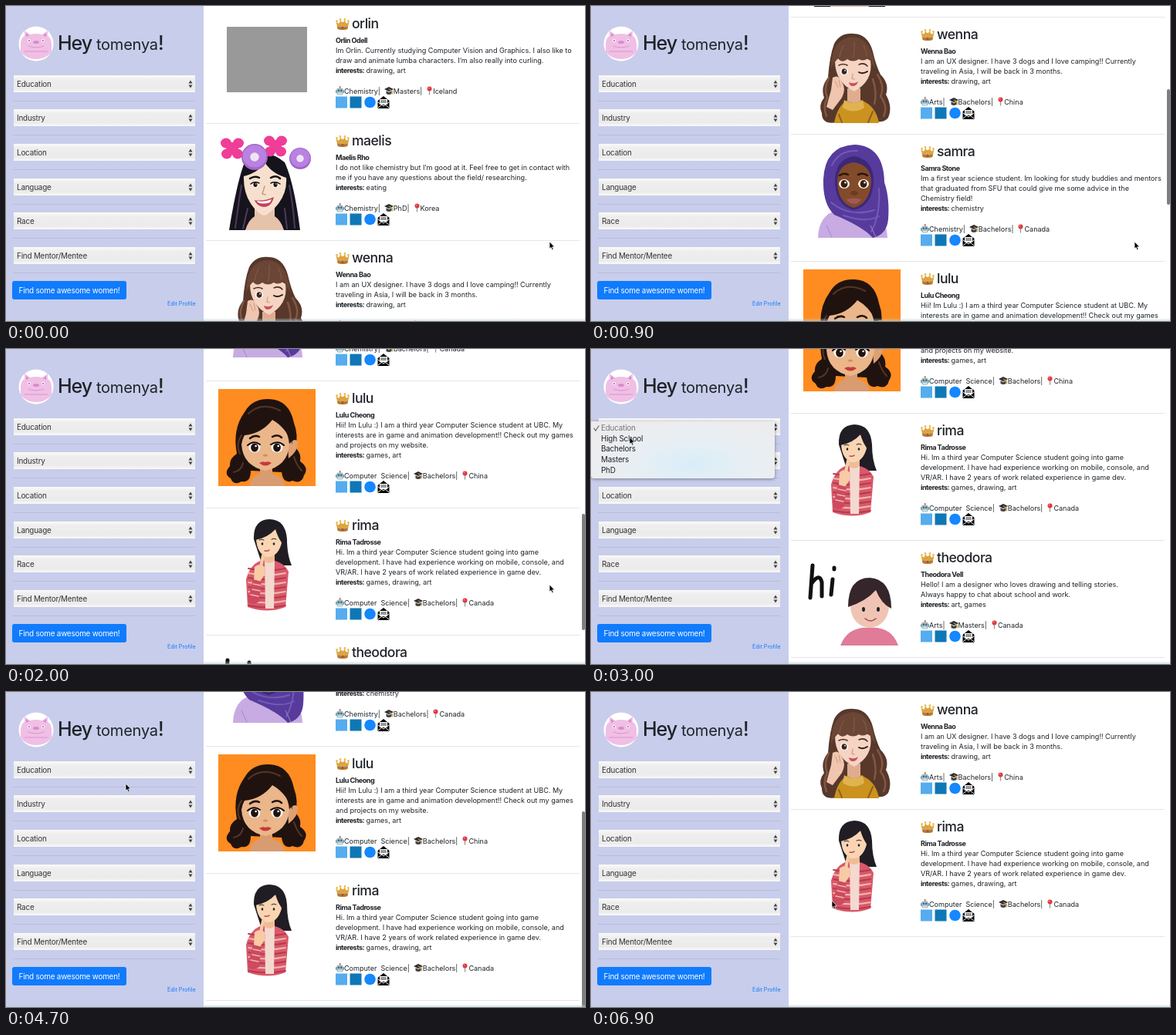
These frames come from a looping animation (750 px wide and 409 px high, 7 s). An HTML page:

```html
<!DOCTYPE html>
<html lang="en">
<head>
<meta charset="utf-8">
<title>Find a mentor</title>
<style>
html, body { margin: 0; width: 100%; height: 100%; overflow: hidden; background: #fff; }
body { position: relative; font: 9.05px/13.2px Inter, sans-serif; color: #1f2328; }
body > *, .row > *, #side > * { position: absolute; }
#side { left: 0; top: 0; width: 256px; height: 409px; background: #c8cdeb; font-size: 9.9px; letter-spacing: -.02em; }
h1 { left: 67px; top: 33px; margin: 0; font: 500 25px/30px Inter, sans-serif; letter-spacing: -.04em; white-space: nowrap; }
h1 small { font-size: 20px; font-weight: 400; letter-spacing: -.01em; }
.select { left: 10px; width: 231px; height: 22px; padding-left: 4px; line-height: 22px; color: #333;
  background: linear-gradient(#fafafa, #eee 25%, #ebebeb 80%, #fafafa); }
.select svg { position: absolute; right: 3px; top: 6px; }
.rule { left: 9px; width: 236px; height: 1px; background: #b9bddb; }
.button { left: 8px; top: 357px; width: 148px; height: 24px; border-radius: 3px; background: #107bfd; color: #fff; line-height: 24px; text-align: center; }
.edit { left: 209px; top: 380px; font-size: 7.2px; letter-spacing: 0; color: #107bfd; white-space: nowrap; }
#menu { left: 0; width: 238px; padding: 2px 0 3px; border-radius: 0 0 4px 4px; font-size: 9.9px; line-height: 13.7px; letter-spacing: -.02em;
  background: radial-gradient(ellipse at 55% 75%, #d9edf8, #e9eff3 45%, #ececee 75%); box-shadow: 0 1px 4px #0006; }
#menu div { padding-left: 13px; }
#menu div:first-child { color: #777; }
#menu svg { position: absolute; left: 3px; top: 5px; }
#list { left: 259px; top: 1px; width: 484px; }
.row { position: relative; border-bottom: 1px solid #e5e5e7; box-sizing: border-box; }
.art { left: 16px; top: 10px; }
.nick { left: 168px; top: 10px; font: 500 17.6px/24px Inter, sans-serif; letter-spacing: -.03em; white-space: nowrap; }
.nick svg { vertical-align: -2px; margin-right: 3px; }
.info { left: 168px; top: 36.5px; white-space: pre; }
.info b { letter-spacing: -.055em; }
.tags { word-spacing: 2.5px; }
.tags svg { vertical-align: -2px; }
.icons { height: 16px; }
#thumb { right: 0; width: 4px; border-radius: 2px; background: #7e7e80; }
#edge { left: 0; bottom: 0; width: 750px; height: 4px; background: linear-gradient(#b9d2dd00, #b9d2dd99); }
#cursor { left: 0; top: 0; }
</style>
</head>
<body>
<div id="list"></div>
<div id="side"></div>
<div id="thumb"></div>
<div id="edge"></div>
<div id="menu"></div>
<svg id="cursor" width="9" height="13"><path d="M1 .5v9.2l2-1.8 1.5 3.4 1.6-.7-1.5-3.3h2.9z" fill="#000" stroke="#fff" stroke-width=".7"/></svg>
<script>
const $ = id => document.getElementById(id);
const svg = (w, h, body, cls = '') => `<svg class="${cls}" width="${w}" height="${h}">${body}</svg>`;
const oval = (x, y, rx, ry, fill) => `<ellipse cx="${x}" cy="${y}" rx="${rx}" ry="${ry}" fill="${fill}"/>`;
const box = (x, y, w, h, fill, r = 0) => `<rect x="${x}" y="${y}" width="${w}" height="${h}" rx="${r}" fill="${fill}"/>`;
const shape = (d, fill) => `<path d="${d}" fill="${fill}"/>`;
const line = (d, color, w = 1.5) => `<path d="${d}" fill="none" stroke="${color}" stroke-width="${w}" stroke-linecap="round"/>`;
const eye = (x, y, r, iris) => oval(x, y, r * 1.15, r, '#fff') + oval(x, y, r * .75, r * .85, iris) + oval(x + r * .25, y - r * .3, r * .2, r * .2, '#fff');

const crown = svg(18, 17, oval(9, 11, 6.5, 3.5, '#8a3d33') + shape('M.5 6l4 3.500 1.500-5.500 3 4.500 3-4.500 1.500 5.500 4-3.500-2 10q-6.500 2-13 0z', '#dfa63c') + shape('M2.300 12.500q6.700 2.500 13.400 0l-.6 3.500q-6.100 1.800-12.200 0z', '#b47a25') +
  [[1.6, 5.5], [6, 3.5], [12, 3.5], [16.4, 5.5]].map(([x, y]) => oval(x, y, 1.4, 1.4, '#e9bf58')).join('') +
  oval(9, 14.3, 1.5, 1.5, '#d2384a') + oval(5, 13.8, 1.1, 1.1, '#4d8fd6') + oval(13, 13.8, 1.1, 1.1, '#4d8fd6'));
const robot = svg(11, 12, box(5, 0, 1.4, 3, '#c8504a') + box(0, 5, 11, 4, '#49a5b5', 1) + box(1.3, 2.5, 8.4, 9, '#a9bcc4', 2) +
  oval(3.8, 5.8, 1.3, 1.3, '#356b80') + oval(7.2, 5.8, 1.3, 1.3, '#356b80') + box(3, 9, 5, 1.3, '#e8eef0'));
const cap = svg(12, 12, shape('M0 4l6-3 6 3-6 3z', '#2c2c30') + shape('M2.5 6l3.5 2 3.5-2v4q-3.500 2-7 0z', '#444') + line('M6 4l4.500 2v4', '#d9a634', 1));
const pin = svg(9, 12, line('M4.500 5v6', '#999', 1.3) + oval(4.5, 3.5, 3, 3, '#e0373f') + oval(3.6, 2.6, .9, .9, '#f79a98'));
const contacts = svg(72, 16, box(0, .5, 15, 15, '#55acee') + box(18.5, .5, 15, 15, '#0f77b5') + oval(44.5, 8, 7.3, 7.3, '#1587ff') +
  shape('M54.500 6l7.500-6 7.500 6v10h-15z', '#000') + box(57, 4, 10, 7, '#fff') + line('M58.500 6h7m-7 2h7', '#000', .8) + line('M55 8l7 5 7-5m-14 7l5-4m9 4l-5-4', '#fff', 1));

const flower = (x, y) => [[-8, -7], [8, -7], [-7, 7], [7, 7]].map(([a, b]) => oval(x + a, y + b, 7, 6.5, '#ef3d98')).join('') + oval(x, y, 8, 8, '#ef3d98');
const ring = (x, y, r) => oval(x, y, r, r, '#a266cc') + oval(x, y - 1, r * .9, r * .85, '#b981e0') + oval(x, y, r * .34, r * .34, '#efe4f6');

const art = {
  block: box(11, 16, 104, 85, '#999'),
  blossoms: shape('M34 40Q60 18 86 40Q98 66 106 128H14Q24 66 34 40z', '#15131c') + line('M30 70Q26 95 22 125M38 100L32 126M92 70Q97 95 99 125M86 100l3 26', '#4c3a5c', 2) +
    shape('M47 99h26v11q8 5 12 18H35q4-13 12-18z', '#e5c3aa') + shape('M33 58Q56 52 59 38Q68 54 88 60Q90 88 63 108Q58 110 53 106Q32 88 33 58z', '#f6e0cd') +
    line('M41 61q6-4 12-1M68 60q7-4 12 1', '#111', 2.5) + eye(48, 69, 3.5, '#23150f') + eye(74, 69, 3.5, '#23150f') + line('M42 68q5-4 11-1M68 67q6-3 12 1', '#111') +
    line('M60 71l-3 10 4 1', '#c79c83') + shape('M47 89Q59 91 72 85Q69 98 59 98Q50 97 47 89z', '#c2415a') + shape('M50 90Q59 92 69 88l-2 4Q58 95 51 92z', '#fff') +
    flower(18, 22) + flower(74, 19) + ring(47, 33, 17) + ring(106, 35, 14),
  wink: shape('M40 24Q48 9 66 11Q84 12 90 34Q94 52 100 64Q112 76 107 90Q116 106 110 120Q104 128 90 124L70 100L44 126Q24 130 24 114Q19 104 27 94Q22 80 32 68Q34 40 40 24z', '#57382b') +
    shape('M40 127Q44 104 58 97H74Q94 104 98 127z', '#cb921f') + shape('M53 97q12 8 24 0l2 10q-14 9-28 0z', '#e0b352') + shape('M57 82h17v16q-8 6-17 0z', '#e0ac90') +
    shape('M41 46Q63 30 87 46Q91 72 66 86Q41 74 41 46z', '#f5d4c3') + shape('M36 56Q36 16 65 15Q90 18 93 56Q88 50 85 42Q78 48 72 44Q64 49 57 44Q50 50 45 43Q40 48 36 56z', '#6b4535') +
    line('M46 52q6-3 11 0M72 51q7-3 11 2', '#4a2e22') + eye(53, 60, 4.5, '#3a241b') + line('M72 61q5 3 11-1', '#2d1c16', 2) + line('M64 63l-1 6 3 1', '#d9a48d') +
    shape('M59 74q7 3 12-1-2 6-7 6-4 0-5-5z', '#c9505a') + shape('M38 68q8-5 12 6 6 8 0 20l-12 16-8-4 6-22z', '#f0c6b0') +
    line('M41 72l4 9m1-10l2 9', '#cf9880', 1) + line('M33 68Q26 82 31 94Q25 106 30 118M96 64Q106 80 100 92Q110 106 104 118M90 70Q96 88 92 102', '#835643', 2.5) +
    line('M52 26Q48 34 47 41M66 22Q66 34 65 42M78 26Q82 34 82 40', '#7d5644') + line('M46 116l4 10M90 112l-6 14', '#8a611b', 2),
  scarf: shape('M19 124Q20 94 44 88H92Q108 100 109 124z', '#c8abe3') + shape('M66 3Q104 4 105 52Q112 72 110 100Q108 120 90 124Q78 110 40 94Q25 80 26 48Q28 5 66 3z', '#563b9c') +
    shape('M65 18Q92 22 91 52Q89 83 65 88Q42 82 41 52Q41 22 65 18z', '#3d2878') + shape('M65 26Q88 29 88 52Q86 80 65 85Q45 79 44 52Q44 29 65 26z', '#824b2b') +
    line('M47 43q5-4 11-1M71 42q7-3 12 1', '#2a150d', 2.5) + eye(53, 54, 6, '#3a1c0d') + eye(78, 54, 6, '#3a1c0d') + oval(66, 66, 5, 3, '#6c3a20') +
    shape('M56 74q9-3 19 0-3 6-9 6-7 0-10-6z', '#a3575a') + line('M37 30Q46 10 70 11M36 78Q60 98 92 88M52 95Q82 105 98 96M98 60Q100 95 88 116', '#735ab7', 2) + line('M30 108l7 15M87 108l7 15', '#a486ca', 1),
  curls: box(0, 0, 126, 126, '#ff8c20') + shape('M34 30Q44 12 66 13Q92 14 98 44Q104 60 100 76Q108 84 106 94Q118 102 111 112Q108 124 96 119Q84 124 82 108L42 106Q42 122 30 120Q20 126 16 116Q6 110 15 100Q14 90 24 84Q18 52 34 30z', '#20130f') +
    shape('M40 126Q42 113 54 110V98H70V110Q84 113 86 126z', '#d99b70') + shape('M90 74q8-12 13-6 1 12-12 22z', '#dfa074') + shape('M30 72Q34 46 66 36Q90 46 92 72Q90 100 61 106Q32 100 30 72z', '#eab68a') +
    shape('M26 72Q30 34 66 26Q94 32 96 72Q88 50 70 40Q56 58 34 60Q30 64 26 72z', '#20130f') + line('M41 64q6-5 12-2M70 62q7-4 12 1', '#21120b', 2.5) +
    eye(47, 76, 6.5, '#20120d') + eye(76, 76, 6.5, '#20120d') + line('M38 73q8-7 16-1M68 72q9-6 17 1', '#140b08', 2) + oval(61, 86, 3, 1.5, '#cd8e67') +
    shape('M53 96q5-3 8-1 4-2 8 1-8 7-16 0z', '#c63a37') + line('M39 32Q56 16 80 28M20 108q10-2 12-12M98 88q4 12 10 18M30 60Q22 72 28 84', '#543628', 2),
  thinker: shape('M46 30Q45 5 66 4Q87 4 89 30Q89 50 95 64H57z', '#201d24') + shape('M38 118L36 82Q42 60 60 56Q84 57 91 72L87 118Q64 127 38 118z', '#d8596b') +
    [...Array(9)].map((_, i) => line(`M39 ${68 + i * 6}q24 5 48 0`, i % 2 ? '#f0b9ab' : '#b83a50', 1.8)).join('') + shape('M60 58h13l-1 62H61z', '#f3d9cf') +
    shape('M59 45h14v13q-7 6-14 0z', '#efbc96') + shape('M49 24Q68 22 79 14L82 35Q77 54 62 53Q48 47 49 24z', '#fad5b4') + shape('M48 31Q49 7 68 8Q85 10 84 37Q77 28 74 17Q64 28 48 31z', '#201d24') +
    line('M53 31q3-2 6 0M69 30q3-2 6 0', '#2a2024', 1) + oval(57, 36, 1.3, 1.8, '#222') + oval(72, 36, 1.3, 1.8, '#222') + line('M60 45q4 1 6-1', '#bd4b4c') +
    line('M58 51L55 66', '#f8cba5', 4) + shape('M47 66q7-6 13 0v10l-6 9-8-2z', '#f8cba5') + shape('M45 82l11 3-3 26q-8 6-15 0z', '#cd4a60') + line('M45 88l10 2m-11 5l10 2m-12 5l10 2', '#f0b9ab'),
  greeting: line('M12 22l-3 42M11 45Q21 31 24 44V62M38 40l-2 20M40 25v2', '#111', 5) + oval(86, 75, 25, 28, '#f0c4b4') +
    shape('M58 76Q58 38 86 38Q114 40 114 78Q101 72 94 54Q82 68 58 76z', '#34262a') + oval(78, 79, 2, 3, '#222') + oval(97, 79, 2, 3, '#222') + line('M80 91q7 6 14 0', '#a9414c') + shape('M48 126Q58 101 86 103Q114 101 123 126z', '#e07b98'),
};

const person = (nick, name, text, likes, field, degree, place, pic) => {
  const height = 126 + text.split('\n').length * 13;
  const html = `<div class="row" style="height:${height}px">${svg(126, 130, art[pic], 'art')}
<div class="nick">${crown}${nick}</div><div class="info"><b>${name}</b>
${text}
<b>interests:</b> ${likes}

<span class="tags">${robot}${field}| ${cap}${degree}| ${pin}${place}</span><div class="icons">${contacts}</div></div></div>`;
  return { html, height };
};
const people = [
  person('orlin', 'Orlin Odell', 'Im Orlin. Currently studying Computer Vision and Graphics. I also like to\ndraw and animate lumba characters. I’m also really into curling.', 'drawing, art', 'Chemistry', 'Masters', 'Iceland', 'block'),
  person('maelis', 'Maelis Rho', 'I do not like chemistry but I’m good at it. Feel free to get in contact with\nme if you have any questions about the field/ researching.', 'eating', 'Chemistry', 'PhD', 'Korea', 'blossoms'),
  person('wenna', 'Wenna Bao', 'I am an UX designer. I have 3 dogs and I love camping!! Currently\ntraveling in Asia, I will be back in 3 months.', 'drawing, art', 'Arts', 'Bachelors', 'China', 'wink'),
  person('samra', 'Samra Stone', 'Im a first year science student. Im looking for study buddies and mentors\nthat graduated from SFU that could give me some advice in the\nChemistry field!', 'chemistry', 'Chemistry', 'Bachelors', 'Canada', 'scarf'),
  person('lulu', 'Lulu Cheong', 'Hii! Im Lulu :) I am a third year Computer Science student at UBC. My\ninterests are in game and animation development!! Check out my games\nand projects on my website.', 'games, art', 'Computer Science', 'Bachelors', 'China', 'curls'),
  person('rima', 'Rima Tadrosse', 'Hi. Im a third year Computer Science student going into game\ndevelopment. I have had experience working on mobile, console, and\nVR/AR. I have 2 years of work related experience in game dev.', 'games, drawing, art', 'Computer Science', 'Bachelors', 'Canada', 'thinker'),
  person('theodora', 'Theodora Vell', 'Hello! I am a designer who loves drawing and telling stories.\nAlways happy to chat about school and work.', 'art, games', 'Arts', 'Masters', 'Canada', 'greeting'),
];
const results = [people, people.slice(2, 6), [people[2], people[5]]];

const labels = ['Education', 'Industry', 'Location', 'Language', 'Race', 'Find Mentor/Mentee'];
const selectTop = i => Math.round(89.6 + 44.7 * i);
const arrows = svg(6, 11, shape('M.5 4.500L3 .5 5.500 4.500zM.5 6.500L3 10.500 5.500 6.500z', '#444'));
const avatar = svg(46, 46, oval(23, 23, 22.5, 22.5, '#fff') + shape('M3 34V22Q4 14 8 13L8 6l7 5q8-2 16 0l7-5v7q4 1 5 9v12q-8 9-20 9t-20-9z', '#f0bfe5') +
  shape('M10 9l4 3-4 2zM36 9l-4 3 4 2z', '#d98bcb') + oval(14, 19, 2, 2, '#fff') + oval(32, 19, 2, 2, '#fff') + oval(14, 19, 1, 1, '#94558e') + oval(32, 19, 1, 1, '#94558e') +
  oval(23, 21, 4, 2, '#d98bcb') + line('M13 26q10 4 20 0M8 33h30', '#d995cd', 1));

$('side').innerHTML = `<div style="left:16px;top:26px">${avatar}</div><h1>Hey <small>tomenya</small>!</h1>` +
  labels.map((label, i) => `<div class="select" style="top:${selectTop(i)}px"><span>${label}</span>${arrows}</div><div class="rule" style="top:${selectTop(i) + 33}px"></div>`).join('') +
  '<div class="button">Find some awesome women!</div><div class="edit">Edit Profile</div>';
const chosen = [...document.querySelectorAll('.select span')];

const menus = { 0: ['Education', 'High School', 'Bachelors', 'Masters', 'PhD'], 5: ['Find Mentor/Mentee', 'Mentor', 'Mentee', 'Both', 'n/a'] };
const check = svg(8, 8, line('M1 4l2 3 4-6', '#666', 1.2));

// Linear motion through [time, ...values] stops.
function track(t, stops) {
  const n = stops.findIndex(s => s[0] > t);
  if (n === 0) return stops[0].slice(1);
  if (n < 0) return stops.at(-1).slice(1);
  const a = stops[n - 1], b = stops[n], k = (t - a[0]) / (b[0] - a[0]);
  return a.slice(1).map((v, i) => v + (b[i + 1] - v) * k);
}
const scrollStops = [
  [[0, 0], [900, 290], [2000, 580], [2400, 703]],
  [[3900, 0], [4500, 247]],
  [[0, 0]],
];
const cursorStops = [[2500, 704, 306], [2800, 60, 101], [3100, 45, 121], [3400, 80, 368], [3600, 80, 368], [3900, 374, 247], [4400, 374, 247],
  [4700, 155, 119], [4900, 60, 101], [5200, 45, 121], [5500, 72, 314], [5600, 72, 314], [5900, 30, 340], [6200, 80, 368], [6500, 80, 368], [6900, 312, 271]];
const between = (t, a, b) => t >= a && t < b;

let shownPage = -1, shownMenu = -1;
function render(t) {
  const page = t < 3600 ? 0 : t < 6500 ? 1 : 2;
  const rows = results[page];
  if (page !== shownPage) $('list').innerHTML = rows.map(r => r.html).join('');
  shownPage = page;

  const scroll = Math.round(track(t, scrollStops[page])[0]);
  $('list').style.transform = `translateY(${-scroll}px)`;
  const ratio = 409 / rows.reduce((sum, r) => sum + r.height, 9);
  $('thumb').style.cssText = `top:${scroll * ratio + 1}px;height:${409 * ratio}px;opacity:${between(t, 100, 2700) || between(t, 4000, 5000) ? 1 : 0}`;

  chosen[0].textContent = between(t, 3200, 3600) || between(t, 5300, 6500) ? 'Bachelors' : labels[0];
  chosen[5].textContent = between(t, 6000, 6500) ? 'Mentee' : labels[5];

  const open = between(t, 2800, 3200) || between(t, 4900, 5300) ? 0 : between(t, 5500, 6000) ? 5 : null;
  $('menu').style.display = open === null ? 'none' : 'block';
  if (open !== null && open !== shownMenu) {
    $('menu').style.top = selectTop(open) + 4 + 'px';
    $('menu').innerHTML = menus[open].map(item => `<div>${item}</div>`).join('') + check;
    shownMenu = open;
  }

  const [x, y] = track(t, cursorStops);
  $('cursor').style.transform = `translate(${x - 1}px,${y - .5}px)`;
}

function tick() {
  render(Math.floor(performance.now() % 7000 / 100) * 100);
  requestAnimationFrame(tick);
}
tick();
</script>
</body>
</html>
```
